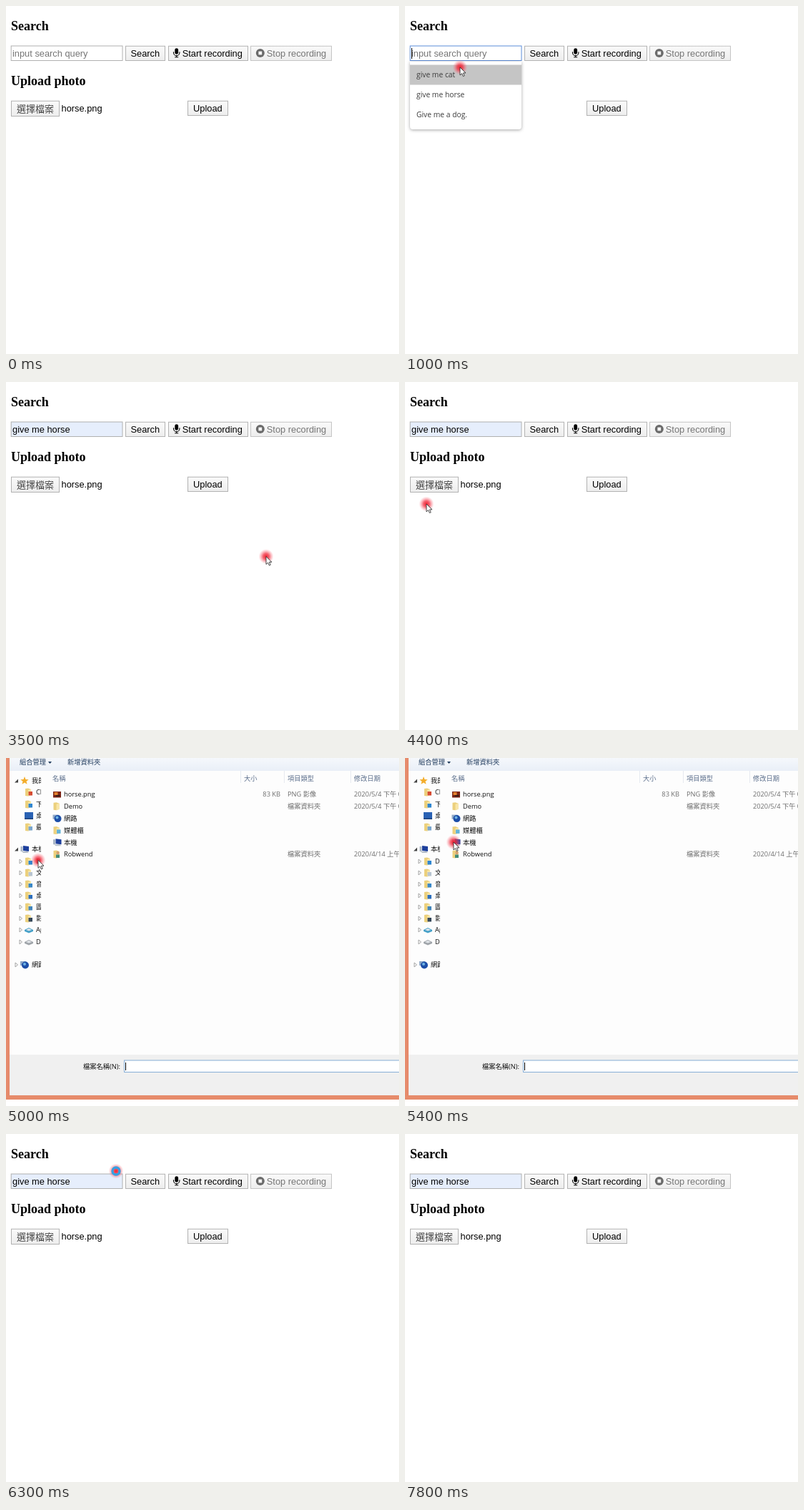
An HTML page with a canvas that plays this animation: 550x488 px, repeating every 8000 ms.

```html
<!DOCTYPE html>
<html lang="zh-Hant">
<head>
<meta charset="utf-8">
<title>Search and upload</title>
<style>
html, body { margin: 0; width: 100%; height: 100%; overflow: hidden; background: #fff; }
canvas { display: block; }
</style>
</head>
<body>
<canvas id="stage" width="550" height="488"></canvas>
<script>
const ctx = document.getElementById('stage').getContext('2d');
const LOOP = 8000, STEP = 100;
const SERIF = 'bold 18px "Liberation Serif", serif';
const SANS = '12.83px "Liberation Sans", sans-serif';
const MENU = '10.3px "Open Sans", sans-serif';
const DIALOG = '9.25px "Open Sans", "Noto Sans CJK TC", "Noto Sans CJK", sans-serif';
const CJK = '13px "Noto Sans CJK TC", "Noto Sans CJK", sans-serif';

// Pointer path: time, x, y
const path = [
  [100, 202, 160], [300, 90, 70], [500, 85, 66], [600, 85, 66],
  [800, 78, 76], [1000, 77, 86], [1300, 72, 124], [1500, 72, 124],
  [2300, 199, 69], [2800, 199, 69], [3100, 335, 185], [3400, 391, 222],
  [3700, 310, 290], [3800, 325, 316], [4000, 190, 240], [4200, 75, 258],
  [4400, 30, 171], [4600, 40, 146], [4900, 40, 146], [5200, 55, 138],
  [5400, 68, 118], [5700, 112, 62], [5900, 154, 52], [6300, 154, 52],
  [6400, 171, 87], [6700, 250, 247], [6800, 250, 247], [7300, 262, 446]
];
const within = (t, a, b) => t >= a && t < b;

function pointer(t) {
  if (!within(t, 100, 7400)) return null;
  for (let i = 1; i < path.length; i++) {
    const [t0, x0, y0] = path[i - 1], [t1, x1, y1] = path[i];
    if (t <= t1) {
      const k = (t - t0) / (t1 - t0);
      return { x: x0 + (x1 - x0) * k, y: y0 + (y1 - y0) * k };
    }
  }
  const [, x, y] = path[path.length - 1];
  return { x, y };
}

function rect(x, y, w, h, color) {
  ctx.fillStyle = color;
  ctx.fillRect(x, y, w, h);
}

function frame(x, y, w, h, color) {
  ctx.strokeStyle = color;
  ctx.lineWidth = 1;
  ctx.strokeRect(x, y, w, h);
}

function text(str, x, y, font, color = '#000', align = 'left') {
  ctx.font = font;
  ctx.fillStyle = color;
  ctx.textAlign = align;
  ctx.fillText(str, x, y);
}

function disc(x, y, r, color) {
  ctx.fillStyle = color;
  ctx.beginPath();
  ctx.arc(x, y, r, 0, 7);
  ctx.fill();
}

function poly(points, color) {
  ctx.beginPath();
  points.forEach(([x, y]) => ctx.lineTo(x, y));
  ctx.closePath();
  ctx.fillStyle = color;
  ctx.fill();
}

function button(x, y, w, h, border = '#b2b2b2') {
  const g = ctx.createLinearGradient(0, y, 0, y + h);
  g.addColorStop(0, '#fafafa');
  g.addColorStop(1, '#ededed');
  rect(x, y, w, h, g);
  frame(x + .5, y + .25, w - 1, h - .75, border);
}

function mic(x, y) {
  ctx.fillStyle = '#000';
  ctx.beginPath();
  ctx.roundRect(x - 2.4, y - 6.5, 4.8, 8.5, 2.4);
  ctx.fill();
  ctx.strokeStyle = '#000';
  ctx.lineWidth = 1.1;
  ctx.beginPath();
  ctx.moveTo(x - 4.2, y - 1.5);
  ctx.arc(x, y - .3, 4.2, Math.PI, 0, true);
  ctx.lineTo(x + 4.2, y - 1.5);
  ctx.moveTo(x, y + 4);
  ctx.lineTo(x, y + 6);
  ctx.moveTo(x - 2.5, y + 6);
  ctx.lineTo(x + 2.5, y + 6);
  ctx.stroke();
}

function page(t, p) {
  const focus = within(t, 400, 2400), filled = t >= 1400;
  text('Search', 7, 33.5, SERIF);
  rect(7, 56, 156, 20.5, filled ? '#e6eefc' : '#fff');
  frame(7.2, 56, 155.8, 20.5, focus ? '#5b8cd8' : '#b0b0b0');
  text(filled ? 'give me horse' : 'input search query', 9, 70.5, SANS, filled ? '#000' : '#757575');
  if (focus) rect(filled ? 91 : 9, 59, 1, 15, '#000');

  button(167, 56, 56, 21);
  text('Search', 174.5, 70.5, SANS);
  button(227, 56, 112, 21);
  mic(238.7, 65.7);
  text('Start recording', 246.7, 70.5, SANS);
  button(342, 56, 114, 21, '#c4c4c4');
  disc(355.8, 66, 6, '#6a6a6a');
  rect(353.4, 63.6, 4.8, 4.8, '#f5f5f5');
  text('Stop recording', 364.8, 70.5, SANS, '#757575');

  text('Upload photo', 7, 111, SERIF);
  button(7, 133, 68, 22);
  text('選擇檔案', 15, 148.7, CJK, '#444');
  text('horse.png', 77.5, 148, SANS);
  button(254, 133, 57, 21);
  text('Upload', 262, 148, SANS);

  if (within(t, 500, 1400)) menu(p);
}

function menu(p) {
  ctx.save();
  ctx.shadowColor = 'rgba(0,0,0,.35)';
  ctx.shadowBlur = 4;
  ctx.shadowOffsetY = 1;
  ctx.fillStyle = '#fff';
  ctx.beginPath();
  ctx.roundRect(7, 78, 156, 95, [0, 0, 4, 4]);
  ctx.fill();
  ctx.restore();
  ['give me cat', 'give me horse', 'Give me a dog.'].forEach((item, i) => {
    const y = 82.5 + i * 28;
    if (p.y >= y && p.y < y + 28) rect(7, y, 156, 28, '#c5c5c5');
    text(item, 16, y + 17.2, MENU, '#3c3c3c');
  });
}

// Small icons, centred on x, y
function folder(x, y, badge) {
  poly([[x - 5, y - 5], [x - 1, y - 5.5], [x + 3, y - 4], [x + 3, y + 4], [x - 1, y + 5.5], [x - 5, y + 5]], '#ecd07c');
  poly([[x - 1, y - 3], [x + 3, y - 4], [x + 3, y + 4], [x - 1, y + 5.5]], '#f8e6a8');
  if (badge) rect(x - .5, y - 1, 5.5, 5.5, badge);
}

function screen(x, y) {
  poly([[x - 2, y - 5], [x + 6, y - 4], [x + 6, y + 3], [x - 2, y + 2]], '#1d3f9c');
  rect(x - 5.5, y - 4, 3, 7, '#a9b6c6');
  poly([[x - 4, y + 3], [x + 4, y + 3], [x + 6, y + 5], [x - 2, y + 5]], '#b5bec9');
}

function desktop(x, y) {
  rect(x - 6, y - 5, 12, 10, '#2a62b4');
  rect(x - 6, y + 3.5, 12, 1.5, '#1b3f78');
}

function globe(x, y) {
  rect(x - 6, y - 5, 8, 6, '#8fa9c8');
  disc(x + 1, y + .5, 5, '#1c4ea8');
  disc(x, y - 1, 2, '#6fb4e4');
}

function star(x, y) {
  const pts = [];
  for (let i = 0; i < 10; i++) {
    const a = i * Math.PI / 5 - Math.PI / 2, r = i % 2 ? 2.6 : 6;
    pts.push([x + r * Math.cos(a), y + r * Math.sin(a)]);
  }
  poly(pts, '#f3ad2b');
}

function drive(x, y, color) {
  poly([[x - 6, y], [x, y - 3], [x + 6, y], [x + 6, y + 2], [x, y + 4.5], [x - 6, y + 2]], color);
  poly([[x - 4, y], [x, y - 2], [x + 4, y], [x, y + 1.5]], '#e2e6ea');
}

function picture(x, y) {
  rect(x - 5.5, y - 4, 11, 8.5, '#7c2416');
  rect(x - 4, y - 3, 5, 4, '#e2812e');
  rect(x - 2, y + 1, 6, 2, '#351d18');
}

function person(x, y) {
  folder(x, y);
  disc(x + 1, y - 2, 2.2, '#d5a071');
  rect(x - 1.5, y + .5, 5, 4.5, '#428b78');
}

function arrow(x, y, open) {
  if (open) return poly([[x + 2.5, y - 2.5], [x + 2.5, y + 2.5], [x - 2.5, y + 2.5]], '#444');
  ctx.strokeStyle = '#999';
  ctx.lineWidth = .9;
  ctx.beginPath();
  ctx.moveTo(x - 1.5, y - 3);
  ctx.lineTo(x + 2, y);
  ctx.lineTo(x - 1.5, y + 3);
  ctx.closePath();
  ctx.stroke();
}

const badge = color => (x, y) => folder(x, y, color);
const disk = color => (x, y) => drive(x, y, color);
const groups = [
  [32, '我的最愛', star, true], [128, '本機', screen, true], [290, '網路', globe, false]
];
const places = [
  [48, 'Cloud', badge('#d64b32')], [65, '下載', badge('#2f86d1')],
  [81, '桌面', desktop], [97, '最近的位置', badge('#7aa6cf')],
  [145, 'Data', badge('#2f86d1')], [161, '文件', badge('#b8c5d2')],
  [177, '音樂', badge('#3988c8')], [193, '桌面', badge('#2d6ebd')],
  [209, '圖片', badge('#4386bd')], [225, '影片', badge('#36485a')],
  [241, 'Apps (C:)', disk('#46a1c9')], [258, 'D.', disk('#a0a5aa')]
];
const files = [
  ['horse.png', picture, '83 KB', 'PNG 影像', '2020/5/4 下午 02:10'],
  ['Demo', folder, '', '檔案資料夾', '2020/5/4 下午 02:12'],
  ['網路', globe, '', '', ''],
  ['媒體櫃', badge('#65b4d8'), '', '', ''],
  ['本機', screen, '', '', ''],
  ['Robwend', person, '', '檔案資料夾', '2020/4/14 上午 10:20']
];

function sidebar() {
  ctx.save();
  ctx.beginPath();
  ctx.rect(5, 18, 44, 398);
  ctx.clip();
  groups.forEach(([y, name, icon, open]) => {
    arrow(14.5, y, open);
    icon(26, y);
    text(name, 36, y + 3.4, DIALOG, '#111');
  });
  places.forEach(([y, name, icon]) => {
    if (y > 128) arrow(20.5, y);
    icon(32, y);
    text(name, 42, y + 3.4, DIALOG, '#111');
  });
  ctx.restore();
}

function dialog() {
  rect(0, 0, 550, 479, '#e68b6b');
  rect(5, 0, 545, 473, '#fdfdfd');
  const g = ctx.createLinearGradient(0, 0, 0, 18);
  g.addColorStop(0, '#f5f8fc');
  g.addColorStop(1, '#e9eff7');
  rect(5, 0, 545, 18, g);
  text('組合管理', 19, 9.4, DIALOG, '#1e395b');
  poly([[59, 5], [64, 5], [61.5, 8]], '#1e395b');
  text('新增資料夾', 86, 9.4, DIALOG, '#1e395b');

  sidebar();
  [[65, '名稱'], [333, '大小'], [394, '項目類型'], [487, '修改日期']].forEach(([x, name], i) => {
    if (i) rect(x - 5, 18, 1, 17, '#e6eaf0');
    text(name, x, 31.6, DIALOG, '#5c6f8c');
  });
  files.forEach(([name, icon, size, type, date], i) => {
    const y = 51 + i * 16.8, base = y + 3.4;
    icon(71.5, y);
    text(name, 81, base, DIALOG, '#111');
    text(size, 384, base, DIALOG, '#6d6d6d', 'right');
    text(type, 394, base, DIALOG, '#6d6d6d');
    text(date, 487, base, DIALOG, '#6d6d6d');
  });

  rect(5, 416, 545, 57, '#f0f0f0');
  text('檔案名稱(N):', 108, 435.6, DIALOG, '#111');
  rect(165, 424, 390, 17, '#fff');
  frame(165.5, 424, 390, 16.5, '#86aed6');
  rect(167, 427, 1, 11, '#000');
}

function halo({ x, y }) {
  const g = ctx.createRadialGradient(x, y, 0, x, y, 10.5);
  g.addColorStop(0, 'rgba(238,22,38,.95)');
  g.addColorStop(.4, 'rgba(242,45,62,.75)');
  g.addColorStop(1, 'rgba(250,120,135,0)');
  disc(x, y, 10.5, g);
}

function busyRing({ x, y }) {
  ctx.strokeStyle = '#36a0e2';
  ctx.lineWidth = 3.4;
  ctx.beginPath();
  ctx.arc(x, y, 5, 0, 7);
  ctx.stroke();
}

function cursor({ x, y }) {
  const shape = [[0, 0], [0, 11], [2.6, 8.6], [4.4, 12.6], [6.2, 11.8], [4.5, 7.9], [8, 7.9]];
  poly(shape.map(([dx, dy]) => [x + dx, y + dy]), '#fff');
  ctx.strokeStyle = '#333';
  ctx.lineWidth = .9;
  ctx.stroke();
}

function draw(now) {
  const t = Math.floor(now % LOOP / STEP) * STEP;
  const p = pointer(t);
  rect(0, 0, 550, 488, '#fff');
  if (within(t, 5000, 6100)) dialog();
  else page(t, p);
  if (!p) return;
  halo(p);
  if (within(t, 6100, 6400)) busyRing(p);
  else cursor(p);
}

const start = performance.now();
function tick() {
  draw(performance.now() - start);
  requestAnimationFrame(tick);
}
tick();
</script>
</body>
</html>
```
